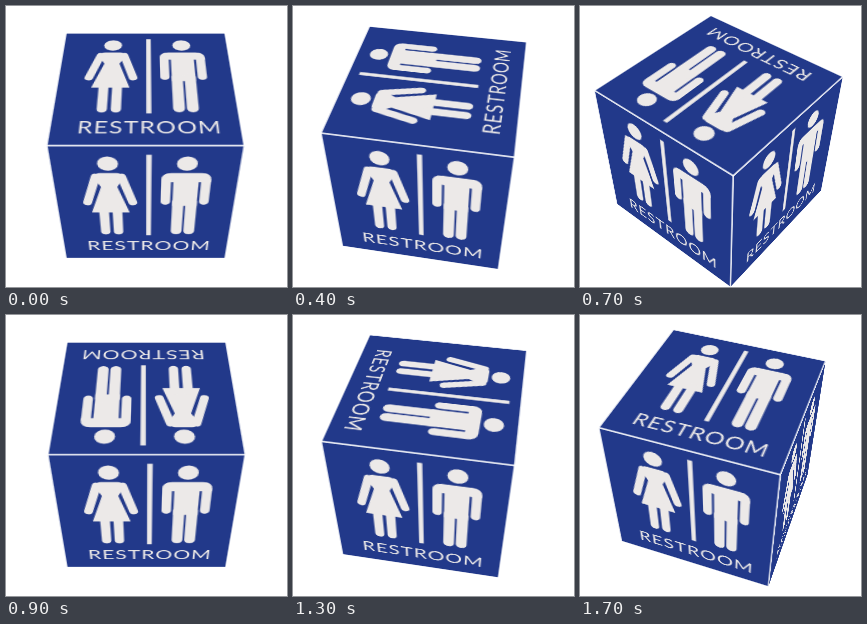
These frames come from a looping animation (281 by 281 pixels, 1800 ms). An HTML page:

```html
<!DOCTYPE html>
<html lang="en">
<head>
<meta charset="utf-8">
<title>Restroom cube</title>
<style>
  html, body { margin: 0; width: 100%; height: 100%; overflow: hidden; background: #fff; }
  .stage {
    position: absolute; left: 0; top: 0; width: 281px; height: 281px; overflow: hidden;
    perspective: 574px; perspective-origin: 139.8px 140px;
  }
  .tilt, .cube { position: absolute; left: 139.8px; top: 140px; width: 0; height: 0; transform-style: preserve-3d; }
  .tilt { transform: rotateX(-45deg); }
  .cube { left: 0; top: 0; }
  .face {
    position: absolute; left: -79.6px; top: -79.6px; width: 159.2px; height: 159.2px;
    backface-visibility: hidden;
  }
  text { font: 20.5px Lato, "Open Sans", sans-serif; letter-spacing: .9px; text-anchor: middle; }
</style>
</head>
<body>
<div class="stage"><div class="tilt"><div class="cube"></div></div></div>
<script>
  const sign = `
    <rect width="158" height="158" fill="#fff"/>
    <rect x=".8" y=".8" width="156.4" height="156.4" fill="#22398a"/>
    <g fill="#ece9e8" stroke="#ece9e8" stroke-width="0" stroke-linecap="round">
      <rect x="79.6" y="10.5" width="4.4" height="109"/>
      <g transform="translate(47.7 0)">
        <circle cy="21" r="8.6"/>
        <path d="M-10 33.5Q-9 32.5-7 32.5H7Q9 32.5 10 33.5L12 40 7 50 17 85H-17L-7 50-12 40Z"/>
        <path d="M-11 37.2L-20 71M11 37.2L20 71" stroke-width="7.8"/>
        <path d="M-6 80V114M6 80V114" stroke-width="8.8"/>
      </g>
      <g transform="translate(113.5 0)">
        <circle cy="21" r="8.6"/>
        <path d="M-21.2 44V41Q-21.2 32.5-12.7 32.5H12.7Q21.2 32.5 21.2 41V44H10.8V76H-10.8V44Z"/>
        <path d="M-17 42V70M17 42V70" stroke-width="8.4"/>
        <path d="M-5.9 70V113M5.9 70V113" stroke-width="10.1"/>
      </g>
      <text x="82.3" y="144">RESTROOM</text>
    </g>`;

  const cube = document.querySelector('.cube');
  const turns = ['rotateX(90deg)', ...[0, 90, 180, 270].map(a => `rotateY(${a}deg)`)];
  cube.innerHTML = turns.map(t =>
    `<svg class="face" viewBox="0 0 158 158" style="transform:${t} translateZ(79.6px)">${sign}</svg>`
  ).join('');

  cube.animate(
    [{ transform: 'rotateY(0deg)' }, { transform: 'rotateY(360deg)' }],
    { duration: 1800, easing: 'steps(18)', iterations: Infinity }
  );
</script>
</body>
</html>
```
